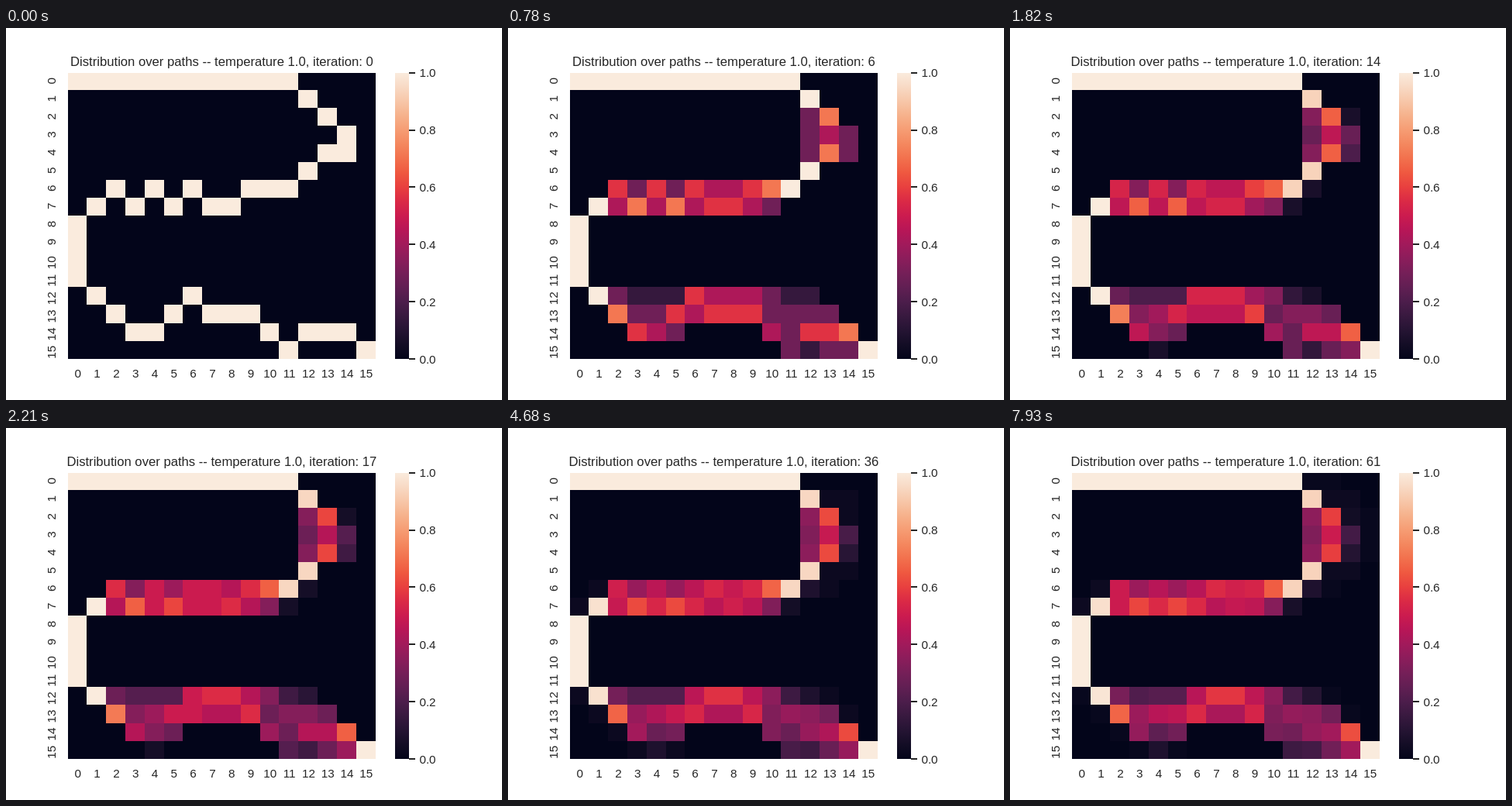
Animation, 640 px wide and 480 px high, one loop 8000 ms. Source, as an HTML page:

```html
<!DOCTYPE html>
<html lang="en">
<head>
<meta charset="utf-8">
<title>Distribution over paths</title>
<style>
  html, body { margin: 0; width: 100%; height: 100%; overflow: hidden; background: #fff; }
  svg { display: block; width: 640px; height: 480px; }
  text { font: 15.28px "Liberation Sans", Arial, sans-serif; fill: #262626; text-anchor: middle; }
  #title { font-size: 16.67px; }
  #scale text { text-anchor: start; }
  rect { shape-rendering: crispEdges; }
</style>
</head>
<body>
<svg viewBox="0 0 640 480">
  <defs><linearGradient id="ramp" x1="0" y1="1" x2="0" y2="0"></linearGradient></defs>
  <g id="cells"></g>
  <g id="axes"></g>
  <g id="scale"><rect x="502" y="58" width="18" height="369" fill="url(#ramp)"/></g>
  <text id="title" x="278.4" y="49"></text>
</svg>
<script>
const SIZE = 16, STEP_MS = 130, LOOP_MS = 8000;
const LEFT = 80, TOP = 57.6, CELL_W = 24.8, CELL_H = 23.1;
const RARE = 0.013;
const $ = id => document.getElementById(id);
const makeGrid = () => Array.from({ length: SIZE }, () => Array(SIZE).fill(0));

function add(parent, tag, attrs, text = '') {
  const el = document.createElementNS('http://www.w3.org/2000/svg', tag);
  for (const key in attrs) el.setAttribute(key, attrs[key]);
  el.textContent = text;
  return parent.appendChild(el);
}

// Colour ramp, evenly spaced from 0 to 1
const ramp = ('03051a 130d25 251433 38193f 4c1d4b 611f53 751f58 8b1d5b a11a5b b71657 cb1b4f ' +
  'da2946 e83f3f ef5840 f2704d f4875e f69c73 f6b18b f7c6a8 f8d9c4 faebdd').split(' ')
  .map(hex => [0, 2, 4].map(i => parseInt(hex.slice(i, i + 2), 16)));

function colour(value) {
  const pos = Math.max(0, Math.min(1, value)) * (ramp.length - 1);
  const i = Math.min(ramp.length - 2, Math.floor(pos));
  const mix = ramp[i].map((c, k) => Math.round(c + (ramp[i + 1][k] - c) * (pos - i)));
  return `rgb(${mix})`;
}

// The first path, as a polyline of column, row corners
const first = makeGrid();
const corners = ('0,0 11,0 14,3 14,4 13,4 11,6 9,6 8,7 7,7 6,6 5,7 4,6 3,7 2,6 0,8 0,11 ' +
  '3,14 4,14 6,12 7,13 9,13 11,15 12,14 14,14 15,15').split(' ').map(p => p.split(',').map(Number));
corners.slice(1).forEach(([x, y], i) => {
  const [px, py] = corners[i];
  const steps = Math.max(Math.abs(x - px), Math.abs(y - py));
  for (let k = 0; k <= steps; k++) first[py + (y - py) * k / steps][px + (x - px) * k / steps] = 1;
});

// The shares the average settles to: straight runs, a round hook and two lanes
const settled = makeGrid();

function profile(row, ...points) {
  points.slice(1).forEach(([x, y], i) => {
    const [px, py] = points[i];
    for (let c = px; c <= x; c++) settled[row][c] = py + (y - py) * (c - px) / (x - px);
  });
}

settled[0].fill(1, 0, 12).fill(RARE, 12, 14);
for (let r = 8; r < 12; r++) settled[r][0] = 1;

for (let r = 1; r <= 5; r++) {
  const off = Math.abs(r - 3);
  const inner = 0.34 + 0.6 * (off / 2) ** 4;
  const outer = 0.03 + 0.1 * Math.exp(-2 * off * off);
  settled[r].splice(12, 4, inner, 1 - inner - outer, outer, off < 2 ? RARE : 0);
}

profile(6, [1, 0.03], [2, 0.47], [3, 0.41], [6, 0.42], [7, 0.58], [9, 0.5], [10, 0.64], [11, 0.94],
  [12, 0.08], [13, 0.02]);
profile(12, [0, 0.02], [1, 0.98], [2, 0.33], [3, 0.23], [5, 0.24], [7, 0.61], [8, 0.62], [10, 0.38],
  [11, 0.18], [13, 0.02]);
profile(14, [2, 0.02], [3, 0.34], [4, 0.2], [5, 0.31], [6, 0], [9, 0], [10, 0.27], [13, 0.37], [14, 0.6]);
profile(15, [3, 0.02], [4, 0.09], [5, 0.02], [6, 0], [10, 0], [11, 0.12], [12, 0.18], [14, 0.42], [15, 1]);

// Rows 7 and 13 take what the rest of their lane leaves over
settled[7][0] = 0.03;
for (let c = 1; c < 12; c++) settled[7][c] = 1 - settled[6][c];
for (let c = 1; c < 15; c++) {
  settled[13][c] = Math.max(0.02, 1 - settled[12][c] - settled[14][c] - settled[15][c]);
}

// Static parts
const edge = (start, size, i) =>
  (i % SIZE ? Math.floor : Math.round)(start + size * i + 1e-6);

const cells = [];
for (let r = 0; r < SIZE; r++) {
  for (let c = 0; c < SIZE; c++) {
    const x = edge(LEFT, CELL_W, c), y = edge(TOP, CELL_H, r);
    cells.push(add($('cells'), 'rect', {
      x, y, width: edge(LEFT, CELL_W, c + 1) - x, height: edge(TOP, CELL_H, r + 1) - y
    }));
  }
}

for (let i = 0; i < SIZE; i++) {
  add($('axes'), 'text', { x: LEFT + CELL_W * (i + 0.5) + 0.4, y: 451 }, i);
  const y = TOP + CELL_H * (i + 0.5) + (i < 10 ? -1 : 2.5);
  add($('axes'), 'text', { transform: `translate(64 ${y}) rotate(-90)` }, i);
}

ramp.forEach((_, i) => {
  const value = i / (ramp.length - 1);
  add($('ramp'), 'stop', { offset: value, 'stop-color': colour(value) });
});
for (let i = 0; i <= 5; i++) {
  const y = TOP + CELL_H * SIZE * (1 - i / 5);
  add($('scale'), 'rect', { x: 520, y: Math.round(y) - 1, width: 8, height: 2, fill: '#262626' });
  add($('scale'), 'text', { x: 533.4, y: Math.round(y + 5.4) }, (i / 5).toFixed(1));
}

// The first path fades into the settled shares; visits are whole counts
function draw(iteration) {
  const total = iteration + 1;
  const memory = total ** -0.7;
  cells.forEach((cell, i) => {
    const r = Math.floor(i / SIZE), c = i % SIZE;
    const share = settled[r][c] + (first[r][c] - settled[r][c]) * memory;
    cell.setAttribute('fill', colour(Math.round(share * total) / total));
  });
  $('title').textContent = `Distribution over paths -- temperature 1.0, iteration: ${iteration}`;
}

const start = performance.now();
let shown = -1;
function tick() {
  const iteration = Math.floor(((performance.now() - start) % LOOP_MS) / STEP_MS);
  if (iteration !== shown) draw(shown = iteration);
  requestAnimationFrame(tick);
}
tick();
</script>
</body>
</html>
```
